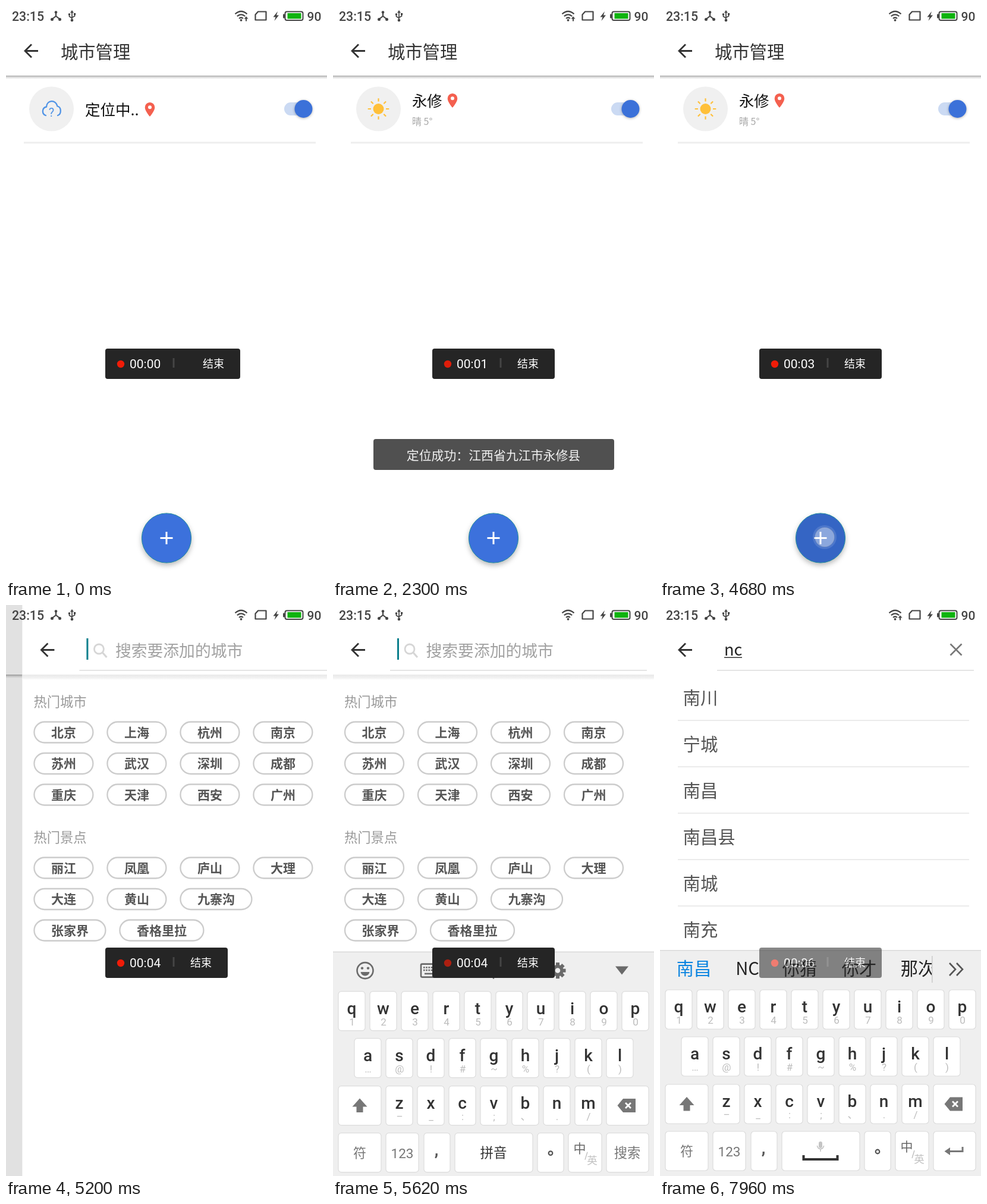
An HTML page that plays this animation: 540 px wide and 960 px high, repeating every 8 s.

```html
<!DOCTYPE html>
<html lang="zh-CN">
<head>
<meta charset="utf-8">
<title>城市管理</title>
<style>
html, body { margin: 0; width: 100%; height: 100%; overflow: hidden; background: #fff; }
svg { display: block; width: 100vw; height: 100vh; }
text { white-space: pre; }
.cjk { font-family: "Noto Sans CJK SC", "Noto Sans CJK", sans-serif; }
.rob { font-family: Roboto, sans-serif; }
.lift { filter: drop-shadow(0 4px 4px rgba(0, 0, 0, .27)); }
.line { fill: none; }
</style>
</head>
<body>
<svg id="stage" viewBox="0 0 540 960" xmlns="http://www.w3.org/2000/svg"></svg>
<script>
const LOOP = 8000;

// y is the visual centre of CJK text and the baseline of Latin text
const cjk = (s, x, y, size, fill, weight = 400, anchor = 'start') =>
  `<text class="cjk" x="${x}" y="${y + size * .38}" font-size="${size}" fill="${fill}" font-weight="${weight}" text-anchor="${anchor}">${s}</text>`;
const rob = (s, x, y, size, fill, weight = 400, anchor = 'start', id = '') =>
  `<text class="rob" ${id && `id="${id}"`} x="${x}" y="${y}" font-size="${size}" fill="${fill}" font-weight="${weight}" text-anchor="${anchor}">${s}</text>`;
const mid = (s, x, y, size, fill, weight) => cjk(s, x, y, size, fill, weight, 'middle');
const rect = (x, y, w, h, fill, rx = 0, more = '') =>
  `<rect x="${x}" y="${y}" width="${w}" height="${h}" rx="${rx}" fill="${fill}" ${more}/>`;
const circle = (x, y, r, fill, more = '') => `<circle cx="${x}" cy="${y}" r="${r}" fill="${fill}" ${more}/>`;
const line = (d, stroke, w, more = '') => `<path class="line" d="${d}" stroke="${stroke}" stroke-width="${w}" ${more}/>`;
const shape = (d, fill) => `<path d="${d}" fill="${fill}"/>`;
const group = (id, body, more = '') => `<g id="${id}" ${more}>${body}</g>`;

const defs = `<defs>
  <linearGradient id="shade" x2="0" y2="1"><stop stop-color="#a8a8a8"/><stop offset=".4" stop-color="#d8d8d8"/><stop offset="1" stop-color="#fff"/></linearGradient>
  <linearGradient id="soft" x2="0" y2="1"><stop stop-color="#e9e9e9"/><stop offset=".6" stop-color="#f1f1f1"/><stop offset="1" stop-color="#fff"/></linearGradient>
  <clipPath id="tray"><rect x="0" y="580" width="458" height="64"/></clipPath>
</defs>`;

const back = line('M54 75.5H32M43 64.5L32 75.5L43 86.5', '#333', 2.8);

function statusBar() {
  const c = '#444';
  return rob('23:15', 10, 24.5, 21.3, c, 500) +
    line('M84 10V17L77 22.5M84 17L91 22.5', c, 2.2) +
    circle(84, 10.5, 2.3, c) + circle(77.5, 22.5, 2.5, c) + circle(90.5, 22.5, 2.5, c) +
    line('M111 10V24M106.5 14V17.5L111 20.5M115.5 13.5V17L111 19.5', c, 1.7) +
    shape('M111 7L114 11.5H108Z', c) + circle(111, 24, 2.3, c) +
    circle(106.5, 14, 1.8, c) + rect(114, 12, 3.2, 3.2, c) +
    line('M385.5 13.5Q395.5 4.5 405.5 13.5M388.8 17.3Q395.5 11.3 402.2 17.3M392 21Q395.5 18 399 21', c, 2.2) +
    circle(395.5, 23.8, 1.9, c) +
    group('data', shape('M404 17.5L407.5 21.5H405V25.5H403V21.5H400.5Z', c)) +
    line('M424 9.5H437.5V23.5H419.5V14.5Z', c, 2.2, 'stroke-linejoin="round"') +
    shape('M457 9L449.5 18.5H453.5L451.5 25L459 15.5H455Z', c) +
    rect(469.5, 9.5, 30, 14.5, 'none', 3, `stroke="${c}" stroke-width="2"`) +
    rect(466, 13.5, 3, 7, c, 1) + rect(473.5, 12, 23, 9.5, '#0fb30f') +
    rob('90', 506.5, 24.5, 21, c, 500);
}

const pin = (id, x, y) => group(id,
  shape('M0 -8.5A8.3 8.3 0 0 0 -8.3 0C-8.3 6 0 15.5 0 15.5S8.3 6 8.3 0A8.3 8.3 0 0 0 0 -8.5Z', '#f4604f') +
  circle(0, -.3, 3, '#fff'), `transform="translate(${x} ${y})"`);

function managePage() {
  let rays = '';
  for (let i = 0; i < 8; i++) {
    const a = i * Math.PI / 4, p = r => `${76.5 + r * Math.cos(a)} ${173 + r * Math.sin(a)}`;
    rays += `M${p(12.5)}L${p(17.8)}`;
  }
  return rect(0, 0, 540, 960, '#fff') + back +
    cjk('城市管理', 92, 77, 29.3, '#333', 300) +
    rect(0, 117, 540, 6, 'url(#shade)') +
    circle(76.5, 173, 37.5, '#f0f0f0') +
    group('cloud',
      line('M67 184C60 182 60 171 68 169.5C69 157.5 84 157 86.5 168.5C93.5 170 93.5 182 87 184', '#4f93e6', 2.3, 'stroke-linecap="round"') +
      rob('?', 76.5, 186, 20, '#4f93e6', 400, 'middle')) +
    group('sun', circle(76.5, 173, 9, '#ffc03a') + line(rays, '#ffc03a', 2.2)) +
    group('locating', cjk('定位中..', 133, 174, 25.5, '#111', 500) + pin('pinA', 242, 170.5)) +
    group('place', cjk('永修', 133, 159, 25.3, '#111', 500) + pin('pinB', 201, 155.5)) +
    group('weather', cjk('晴 5°', 133, 194, 16, '#a8a8a8', 400)) +
    rect(468, 162, 44, 22, '#cbdaf3', 11) +
    circle(500.5, 173, 15, '#3b71d9', 'style="filter:drop-shadow(0 1px 2px rgba(0,0,0,.3))"') +
    rect(30, 228.3, 491, 3, '#eee') +
    circle(270, 894.5, 41.6, '#3c71dc', 'class="lift" stroke="#1c8a9c" stroke-width="1"') +
    circle(270, 894.5, 41, '#000', 'id="ripple" opacity="0"') +
    line('M259.5 894.5H280.5M270 884V905', '#fff', 3);
}

function pills(rows, y0) {
  return rows.map((row, r) => {
    let x = 19;
    const y = y0 + r * 52.5;
    return row.split(' ').map(name => {
      const w = 59 + 21 * name.length;
      const out = rect(x + 1, y - 17.5, w - 2, 35, '#fff', 17.5, 'stroke="#ccc" stroke-width="2.3"') +
        mid(name, x + w / 2, y, 21, '#555', 700);
      x += w + 22;
      return out;
    }).join('');
  }).join('');
}

function searchPage() {
  const names = ['南川', '宁城', '南昌', '南昌县', '南城', '南充'];
  return rect(0, 0, 540, 960, '#fff') + back +
    group('hint', line('M134.5 79.5L142 88', '#d6d6d6', 3.2) +
      circle(129, 74, 8, 'none', 'stroke="#d6d6d6" stroke-width="2.8"') +
      cjk('搜索要添加的城市', 156.5, 77, 26.8, '#a2a2a2', 300)) +
    group('hot', rect(0, 117, 540, 9, 'url(#soft)') +
      cjk('热门城市', 19, 163, 22.3, '#999') +
      pills(['北京 上海 杭州 南京', '苏州 武汉 深圳 成都', '重庆 天津 西安 广州'], 214) +
      cjk('热门景点', 19, 391, 22.3, '#999') +
      pills(['丽江 凤凰 庐山 大理', '大连 黄山 九寨沟', '张家界 香格里拉'], 442)) +
    group('list', names.map((n, i) => cjk(n, 38.5, 156 + 78 * i, 29.4, '#555') +
      rect(30, 193 + 78 * i, 490, 2, '#ebebeb')).join('')) +
    group('typed', '<text class="cjk" id="query" x="108" y="85" font-size="27" font-weight="300" fill="#222"></text>' +
      rect(108, 87.5, 30, 1.5, '#333', 0, 'id="under"') +
      line('M488.5 65.5L507.5 84.5M507.5 65.5L488.5 84.5', '#777', 2.5)) +
    rect(96, 109, 432, 1.6, '#dedede') +
    rect(108, 56, 3, 36, '#0b7f8c', 0, 'id="caret"');
}

const key = (x, y, w) => rect(x, y, w, 66, '#fff', 5, 'stroke="#dcdcdc" stroke-width="1.2"');

function letters(chars, subs, x0, y) {
  return [...chars].map((ch, i) => {
    const x = x0 + i * 53;
    return key(x, y, 45) + rob(ch, x + 22.5, y + 38, 28, '#333', 500, 'middle') +
      rob(subs[i], x + 23, y + 57, 17, '#bcbcbc', 400, 'middle');
  }).join('');
}

function toolbar() {
  const c = '#6a6a6a';
  let teeth = '', dots = '';
  for (let i = 0; i < 8; i++)
    teeth += `<rect x="375" y="598.5" width="6" height="7" fill="${c}" transform="rotate(${i * 45} 378 612)"/>`;
  for (let i = 0; i < 10; i++) dots += rect(152 + i % 5 * 4.2, 605.5 + (i / 5 | 0) * 4.6, 2.6, 2.6, c);
  return circle(54, 612, 13.5, 'none', `stroke="${c}" stroke-width="2.6"`) +
    circle(49, 608, 2.2, c) + circle(59, 608, 2.2, c) + shape('M46.5 614.5H61.5A7.6 7.6 0 0 1 46.5 614.5Z', c) +
    rect(148, 601, 27, 22, 'none', 2, `stroke="${c}" stroke-width="2.6"`) + dots + rect(154, 616, 14, 2.6, c) +
    rect(265.5, 597, 9, 18, c, 4.5) + line('M261 610A9 9 0 0 0 279 610M270 619V626', c, 2.4) +
    teeth + circle(378, 612, 7, 'none', `stroke="${c}" stroke-width="5.5"`) +
    shape('M475 605H497L486 619Z', c);
}

function keyboard() {
  const g = '#777';
  const spread = [...'年你能呢那南'].map((ch, i) => mid(ch, 45 + 75 * i, 611, 29, i ? '#222' : '#0b84e0')).join('');
  const pairs = ['南昌', 'NC', '你猜', '你才', '那次'];
  const at = [57, 147, 235, 335, 434];
  return rect(0, 580, 540, 390, '#efefef') + rect(0, 580, 540, 1.5, '#d9d9d9') +
    group('tools', toolbar()) +
    group('candN', spread) +
    group('candNC', pairs.map((s, i) => mid(s, at[i], 611, 29.2, i ? '#222' : '#0b84e0')).join(''), 'clip-path="url(#tray)"') +
    group('more', rect(457, 590, 1.6, 45, '#ccc') +
      line('M487 602L497 612.5L487 623M499 602L509 612.5L499 623', '#555', 2.6)) +
    letters('qwertyuiop', '1234567890', 9, 647) +
    letters('asdfghjkl', '…@!#~%?()', 36, 726) +
    letters('zxcvbnm', '–_:;、./', 89, 806) +
    key(9, 806, 72) + shape('M45 827L57.5 841H50.5V850.5H39.5V841H32.5Z', g) +
    key(460, 806, 71) + shape('M478.5 839L488 827.5H509V850.5H488Z', g) +
    line('M492 834.5L501 843.5M501 834.5L492 843.5', '#fff', 2.8) +
    key(9, 885, 72) + mid('符', 45, 918, 22, g) +
    key(89, 885, 55) + rob('123', 116.5, 927, 22.5, g, 400, 'middle') +
    key(153, 885, 44) + rob(',', 174, 922, 27, '#555', 700, 'middle') +
    key(205, 885, 131) +
    key(344, 885, 44) + circle(366, 919, 3.3, 'none', 'stroke="#555" stroke-width="2.2"') +
    key(396, 885, 56) + mid('中', 415, 910, 21, '#666') + mid('英', 436, 931, 17.5, '#c2c2c2') +
    line('M428 917L424 930', '#bbb', 1.3) +
    key(460, 885, 71) +
    group('idleKeys', mid('拼音', 270, 918, 22.5, '#333') + mid('搜索', 495, 918, 22.3, g)) +
    group('busyKeys', rect(267, 902, 6, 11, '#c4c4c4', 3) +
      line('M264.5 909A5.5 5.5 0 0 0 275.5 909M270 914.5V919', '#c4c4c4', 1.6) +
      line('M241.5 925V932H298.5V925', '#333', 4) +
      line('M509 911V918.5H485', g, 3) + shape('M478.5 918.5L488 912V925Z', g));
}

const recorder = rect(167, 576, 206, 51, '#252525', 4, 'id="plate"') +
  rect(280.5, 592, 3, 16, '#454545') + circle(193, 602, 6.2, '#f01c08', 'id="dot"') +
  rob('00:00', 208, 608.5, 21, '#fff', 400, 'start', 'clock') +
  group('stop', cjk('结束', 310, 601, 18, '#fff'));

const toast = rect(68, 728, 405, 52, '#505050', 4) +
  mid('定位成功：江西省九江市永修县', 270, 755.5, 20.9, '#f2f2f2', 300);

document.getElementById('stage').innerHTML = defs +
  managePage() +
  rect(0, 0, 540, 960, '#000', 0, 'id="dim"') +
  group('search', searchPage()) +
  group('keys', keyboard()) +
  statusBar() +
  group('toast', toast) +
  group('recorder', recorder) +
  group('touch', circle(0, 0, 20, '#fff', 'opacity=".12"') +
    circle(0, 0, 16, '#fff', 'fill-opacity=".35" stroke="#bbb" stroke-opacity=".35" stroke-width="1.2"'));

const ui = {};
document.querySelectorAll('[id]').forEach(e => ui[e.id] = e);
const show = (id, on) => ui[id].setAttribute('display', on ? 'inline' : 'none');
const set = (id, name, v) => ui[id].setAttribute(name, v);
const ramp = (t, a, b) => Math.min(1, Math.max(0, (t - a) / (b - a)));
const easeOut = u => 1 - (1 - u) ** 2;
const within = (t, a, b) => t >= a && t < b;

const FOUND = 400, WEATHER = 1000, SLIDE = 4950, KEYS = 5300;
const CAND = 6560, TYPE_N = 6640, TYPE_C = 7000;
const taps = [
  { a: 4560, b: 4800, x: 277, y: 893 },
  { a: 6480, b: 6640, x: 373, y: 835 },
  { a: 6880, b: 7020, x: 217, y: 835 }
];

function draw(t) {
  // city row
  show('cloud', t < WEATHER);
  show('sun', t >= WEATHER);
  show('weather', t >= WEATHER);
  show('locating', t < FOUND);
  show('place', t >= FOUND);
  set('place', 'transform', `translate(0 ${t < WEATHER ? 15 : 0})`);
  set('toast', 'opacity', ramp(t, FOUND, 600) * (1 - ramp(t, 2700, 2950)));
  show('data', t < 2700 || t >= 7050);

  // floating button press
  set('ripple', 'r', 41 * easeOut(ramp(t, 4540, 4680)));
  set('ripple', 'opacity', .11 * ramp(t, 4540, 4620) * (1 - ramp(t, 4800, 4920)));

  // page slide and keyboard
  const slide = easeOut(ramp(t, SLIDE, SLIDE + 324));
  show('search', t >= SLIDE);
  set('search', 'transform', `translate(${540 * (1 - slide)} 0)`);
  set('dim', 'opacity', .125 * slide);
  show('keys', t >= KEYS);
  set('keys', 'transform', `translate(0 ${380 * (1 - easeOut(ramp(t, KEYS, KEYS + 350)))})`);

  // typing
  const cand = t >= CAND, typed = t >= TYPE_N, both = t >= TYPE_C;
  show('tools', !cand);
  show('idleKeys', !cand);
  show('busyKeys', cand);
  show('more', cand);
  show('candN', cand && !both);
  show('candNC', both);
  show('hint', !typed);
  show('typed', typed);
  show('hot', !both);
  show('list', both);
  ui.query.textContent = both ? 'nc' : 'n';
  set('under', 'width', both ? 30 : 16);
  set('caret', 'x', both ? 137 : typed ? 124 : 108);
  const since = t - (both ? TYPE_C : typed ? TYPE_N : 5560);
  show('caret', since < 0 || since % 1000 < 500);

  // recorder
  const sec = Math.max(0, Math.floor((t - 1050) / 1000));
  const wide = t < 120, p = t % 900;
  ui.clock.textContent = '00:0' + sec;
  set('plate', 'width', wide ? 227 : 206);
  set('stop', 'transform', `translate(${wide ? 21 : 0} 0)`);
  set('dot', 'opacity', within(p, 200, 600) ? 1 - .35 * (600 - p) / 400 : 1);
  set('recorder', 'opacity', 1 - .46 * ramp(t, 6000, 6300));

  // finger marker
  const tap = taps.find(k => within(t, k.a, k.b));
  show('touch', tap);
  if (tap) set('touch', 'transform', `translate(${tap.x} ${tap.y})`);
}

const start = performance.now();
function tick() {
  draw((performance.now() - start) % LOOP);
  requestAnimationFrame(tick);
}
tick();
</script>
</body>
</html>
```
